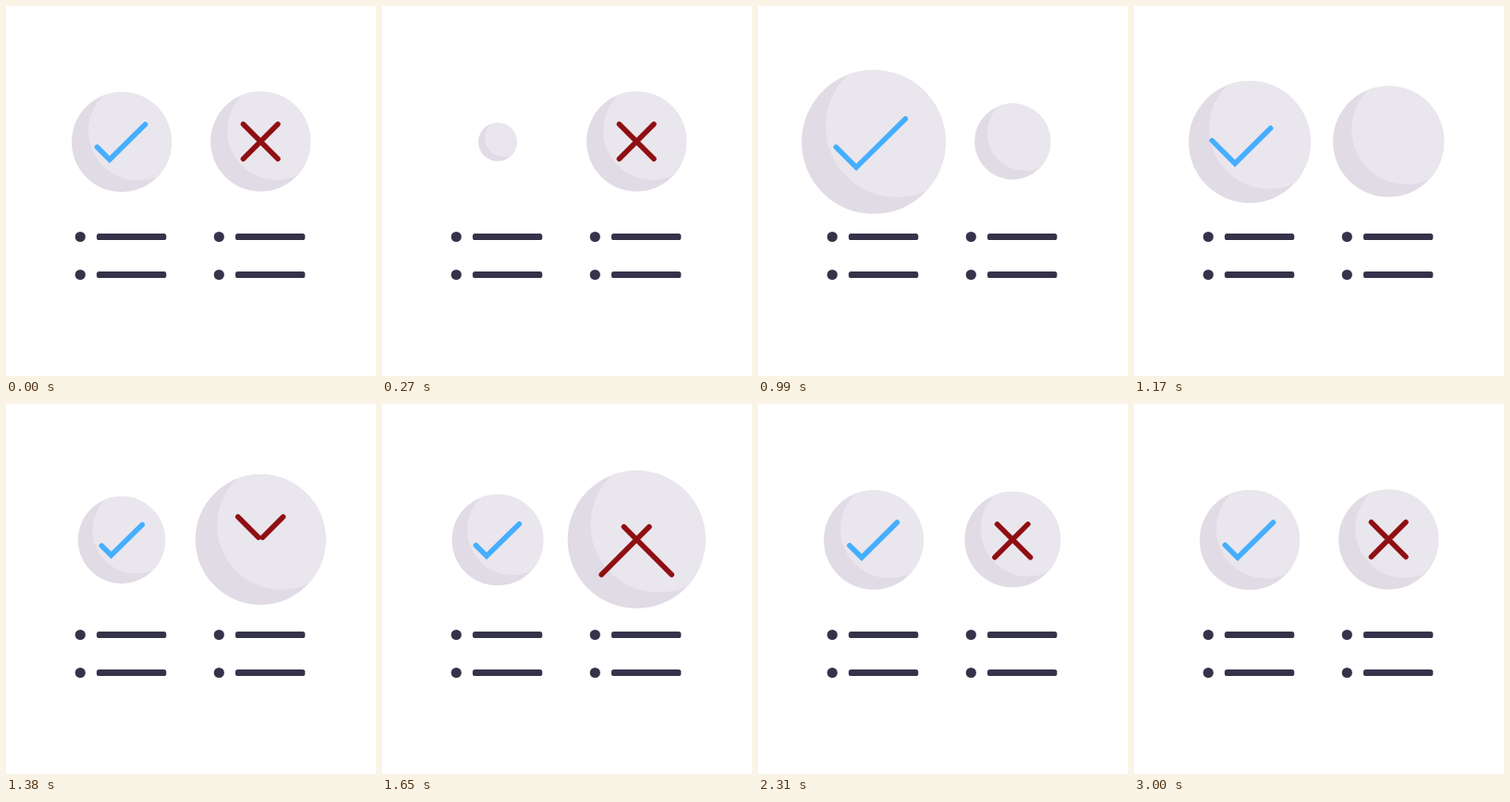
Animation of 400x400 px, one loop 3090 ms. Source, as an HTML page without scripts:

```html
<!DOCTYPE html>
<html lang="en">
<head>
<meta charset="utf-8">
<title>Pros and cons</title>
<style>
@property --s { syntax: "<number>"; inherits: true; initial-value: 1; }
html, body { margin: 0; width: 100%; height: 100%; overflow: hidden; background: #fff; }
svg { display: block; width: 100vw; height: 100vh; }

.badge { transform: scale(var(--s)); animation: 3.09s infinite; }
.yes { animation-name: popYes; }
.no { animation-name: popNo; }
.shade { fill: #e0dbe5; }
.face { fill: #eae6ed; }
.list { fill: #36324a; }

/* stroke keeps its width while the badge scales */
.mark { fill: none; stroke-width: calc(5.6px / var(--s)); stroke-linecap: round; animation: 3.09s infinite; }
.tick { stroke: #45aeff; stroke-dasharray: 73.2 300; animation-name: drawTick; }
.cross { stroke: #8f0f12; stroke-dasharray: 52.9 300; animation-name: drawCross; }

.badge, .mark { animation-timing-function: cubic-bezier(.37, 0, .63, 1); }

@keyframes popYes {
  0%, .97% { --s: 1; }
  6.47% { --s: .2; animation-timing-function: cubic-bezier(.3, .2, .6, .85); }
  17.48% { --s: 1.139; animation-timing-function: cubic-bezier(.2, .5, .6, 1); }
  31.4% { --s: 1.444; }
  46.93% { --s: .843; }
  63.43% { --s: 1.055; }
  78.96% { --s: .985; }
  87.4%, 100% { --s: 1; }
}
@keyframes popNo {
  0%, 19.4% { --s: 1; }
  25.24% { --s: .2; animation-timing-function: cubic-bezier(.3, .2, .6, .85); }
  37.86% { --s: 1.111; animation-timing-function: cubic-bezier(.2, .5, .6, 1); }
  52.91% { --s: 1.382; }
  66.67% { --s: .87; }
  84.14% { --s: 1.07; }
  97.09%, 100% { --s: 1; }
}
@keyframes drawTick {
  0%, .97% { stroke-dashoffset: 0; }
  5.5% { stroke-dashoffset: 80; }
  19.42% { stroke-dashoffset: 80; animation-timing-function: cubic-bezier(.3, .4, .7, .8); }
  31.4% { stroke-dashoffset: 0; animation-timing-function: cubic-bezier(.33, .6, .67, 1); }
  36.4% { stroke-dashoffset: -10.3; }
  47.73% { stroke-dashoffset: 5; }
  59.06% { stroke-dashoffset: -2.6; }
  70.39% { stroke-dashoffset: 1.2; }
  81.72% { stroke-dashoffset: -.6; }
  97.09%, 100% { stroke-dashoffset: 0; }
}
@keyframes drawCross {
  0%, 19.4% { stroke-dashoffset: 0; }
  24% { stroke-dashoffset: 60; }
  39.8% { stroke-dashoffset: 60; animation-timing-function: cubic-bezier(.3, .4, .7, .8); }
  50.8% { stroke-dashoffset: 0; animation-timing-function: cubic-bezier(.33, .6, .67, 1); }
  55.34% { stroke-dashoffset: -15.5; }
  66.34% { stroke-dashoffset: 7; }
  77.67% { stroke-dashoffset: -3.5; }
  89% { stroke-dashoffset: 1.5; }
  97.09%, 100% { stroke-dashoffset: 0; }
}
</style>
</head>
<body>
<svg viewBox="0 0 400 400">
  <defs>
    <clipPath id="disc"><circle r="54"/></clipPath>
    <g id="ball">
      <circle class="shade" r="54"/>
      <g clip-path="url(#disc)"><circle class="face" cx="17.3" cy="-11.8" r="53.3"/></g>
    </g>
    <g id="row">
      <circle cx="80.3" cy="0" r="5.6"/>
      <rect x="98" y="-3.5" width="75.3" height="7" rx="2.6"/>
    </g>
    <g id="rows">
      <use href="#row" y="249.5"/>
      <use href="#row" y="290.5"/>
    </g>
  </defs>

  <g class="list">
    <use href="#rows"/>
    <use href="#rows" x="150"/>
  </g>

  <g transform="translate(125 147)">
    <g class="badge yes">
      <use href="#ball"/>
      <path class="mark tick" d="M25.5-19L-13 19L-41-9"/>
    </g>
  </g>

  <g transform="translate(275.2 146.5)">
    <g class="badge no">
      <use href="#ball"/>
      <path class="mark cross" d="M-18.7-18.7L32 32"/>
      <path class="mark cross" d="M18.7-18.7L-32 32"/>
    </g>
  </g>
</svg>
</body>
</html>
```
